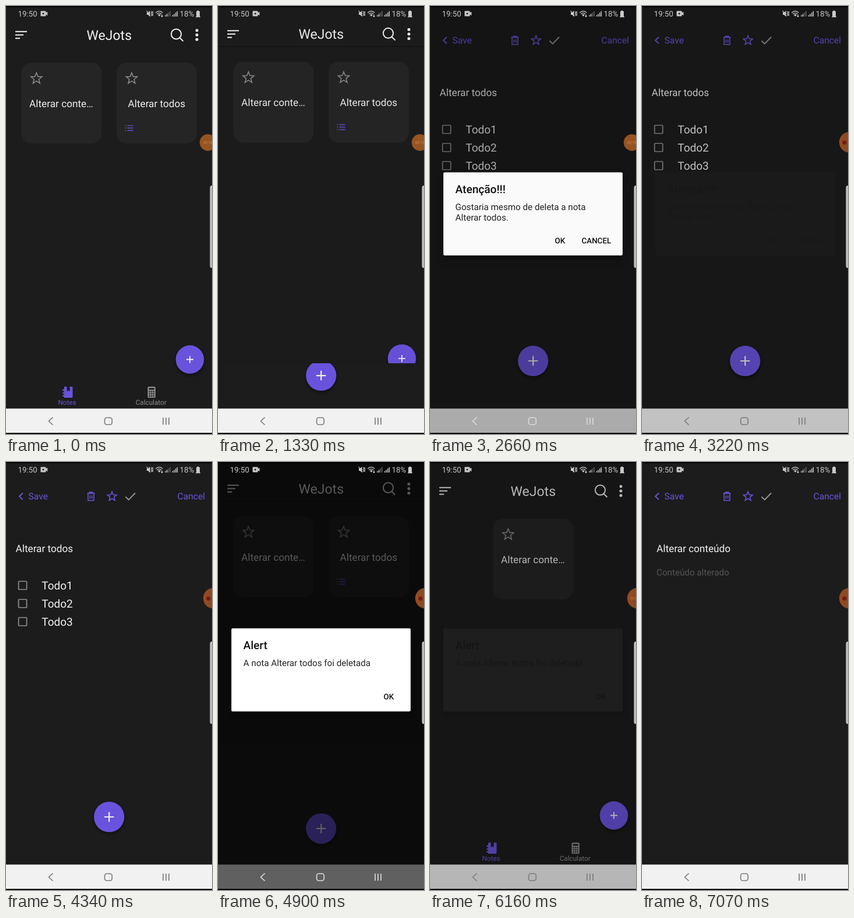
Animation, 354 px wide and 732 px high, one loop 8 s. Source, as an HTML page:

```html
<!DOCTYPE html>
<html lang="pt">
<head>
<meta charset="utf-8">
<title>Notes</title>
<style>
html, body { margin: 0; width: 354px; height: 732px; overflow: hidden; background: #1c1c1c; }
svg { display: block; font-family: Roboto, sans-serif; text-rendering: geometricPrecision; }
</style>
</head>
<body>
<svg id="stage" width="354" height="732" viewBox="0 0 354 732" fill="none">
  <defs>
    <filter id="shadow" x="-40%" y="-40%" width="180%" height="190%">
      <feDropShadow dx="0" dy="3" stdDeviation="3" flood-color="#000" flood-opacity=".5"/>
    </filter>
    <filter id="lift" x="-10%" y="-20%" width="120%" height="150%">
      <feDropShadow dx="0" dy="7" stdDeviation="7" flood-color="#000" flood-opacity=".4"/>
    </filter>
    <clipPath id="reveal"><rect id="revealBox" width="354" height="688"/></clipPath>
    <linearGradient id="amber" x1="0" x2="1">
      <stop offset="0" stop-color="#9c4820"/><stop offset=".5" stop-color="#834c24"/>
    </linearGradient>
    <path id="star"/>
    <g id="card">
      <rect width="138" height="138" rx="17" fill="#252525"/>
      <use href="#star" transform="translate(26 27.1)" stroke="#8a8a8a" stroke-width="1.6"/>
    </g>
  </defs>
  <rect width="354" height="732" fill="#1c1c1c"/>

  <g id="home">
    <rect width="354" height="720" fill="#1c1c1c"/>
    <path id="rule" d="M0 71H354" stroke="#000" stroke-opacity=".45"/>
    <g stroke="#f2f2f2" stroke-width="2">
      <path d="M16 43.8H36M16 49.5H30M16 55.2H24"/>
      <circle cx="292.5" cy="48" r="8.6"/><path d="M298.6 54.3L304.5 60.2"/>
    </g>
    <g fill="#f2f2f2">
      <circle cx="328" cy="41.8" r="2.5"/><circle cx="328" cy="49.5" r="2.5"/><circle cx="328" cy="57.2" r="2.5"/>
      <text x="177.3" y="58" font-size="23" text-anchor="middle">WeJots</text>
    </g>
    <g id="first">
      <use href="#card"/>
      <text x="13.8" y="76" font-size="17.2" fill="#efefef">Alterar conte…</text>
    </g>
    <g id="second" transform="translate(190 97)">
      <use href="#card"/>
      <text x="19.5" y="76" font-size="17.2" fill="#efefef">Alterar todos</text>
      <path d="M18.5 107.5H28.5M18.5 111.7H28.5M18.5 115.9H28.5M14.5 107.5h1.8M14.5 111.7h1.8M14.5 115.9h1.8" stroke="#5c49be" stroke-width="1.7"/>
    </g>
    <g filter="url(#shadow)"><circle cx="316" cy="604.5" r="24.2" fill="#6a53dc"/></g>
    <path d="M310 604.5h12M316 598.5v12" stroke="#f0eefa" stroke-width="1.8"/>
    <g fill="#6a53dc">
      <path d="M100 651h4.6v8.2l2.5-1.8 2.5 1.8V651h3.2q1.7 0 1.7 1.7v15.6q0 1.7-1.7 1.7H100v-2h-1.7l-1.6-1.4 1.6-1.4H100v-2h-1.7l-1.6-1.4 1.6-1.4H100v-2h-1.7l-1.6-1.4 1.6-1.4H100z"/>
      <text x="105" y="682" font-size="11.7" text-anchor="middle">Notes</text>
    </g>
    <g fill="#8f8f8f">
      <rect x="243.5" y="651" width="13.3" height="19" rx="1.8"/>
      <text x="249.2" y="682" font-size="11.7" text-anchor="middle">Calculator</text>
    </g>
    <path d="M245.6 654.8h9.2" stroke="#1c1c1c" stroke-width="3"/>
    <path d="M245.6 659.7h9.2M245.6 663.4h9.2M245.6 667.1h9.2" stroke="#1c1c1c" stroke-width="2.2" stroke-dasharray="2.2 1.3"/>
    <rect id="veil" width="354" height="720" fill="#000"/>
  </g>

  <g clip-path="url(#reveal)">
    <g id="edit">
      <rect y="-60" width="354" height="780" fill="#1c1c1c"/>
      <g stroke="#6a53dc" stroke-width="2">
        <path d="M28.8 53L23 58.7L28.8 64.4"/>
        <path d="M139.5 53.6h13M143.4 53.3v-1.7h5.2v1.7M141 54v11.8h10V54M144.3 57.3v5.4M147.7 57.3v5.4" stroke-width="1.6"/>
        <use href="#star" transform="translate(182.2 59) scale(.83)" stroke-width="1.9"/>
      </g>
      <path d="M205.5 59.5L210.8 64.6L222 53" stroke="#959595" stroke-width="2"/>
      <g fill="#6a53dc" font-size="15.6">
        <text x="38.6" y="64.4">Save</text><text x="294.5" y="64.4">Cancel</text>
      </g>
      <g id="todos">
        <text x="16.5" y="154" font-size="17.2" fill="#f2f2f2">Alterar todos</text>
        <g id="list"></g>
        <g filter="url(#shadow)"><circle cx="177.2" cy="607" r="26" fill="#6a53dc"/></g>
        <path d="M169 607h16.4M177.2 598.8v16.4" stroke="#f0eee0" stroke-width="2.2"/>
      </g>
      <g id="plain">
        <text x="25" y="154" font-size="17.2" fill="#f2f2f2">Alterar conteúdo</text>
        <text x="25" y="194" font-size="15.2" fill="#555">Conteúdo alterado</text>
      </g>
    </g>
  </g>

  <rect y="688.5" width="354" height="41.5" fill="#f1f1f1"/>
  <rect id="dim" width="354" height="732" fill="#000"/>

  <g id="dialog">
    <rect x="23" y="284.5" width="308" height="142" rx="2" fill="#fff" filter="url(#lift)"/>
    <g fill="#111">
      <text id="head" x="43.5" y="320" font-size="19.1" font-weight="500"></text>
      <text id="line1" x="43.6" y="348.6" font-size="15.2" fill="#222"></text>
      <text id="line2" x="43.6" y="366.6" font-size="15.2" fill="#222"></text>
      <g font-size="13.4" font-weight="500">
        <text id="ok" y="405.6">OK</text>
        <text id="cancel" x="260.5" y="405.6">CANCEL</text>
      </g>
    </g>
  </g>

  <path d="M0 1H354M0 731H354" stroke="#000" stroke-width="2"/>
  <g id="nav" stroke-width="1.7">
    <path d="M80.5 703.5L73.5 710L80.5 716.5"/>
    <rect x="169.6" y="704" width="12.6" height="12" rx="3.6"/>
    <path d="M270 704v12M275 704v12M280 704v12"/>
  </g>

  <g fill="#c9c9c9">
    <g font-size="13.3"><text x="20.5" y="17.6">19:50</text><text x="298.5" y="17.6">18%</text></g>
    <path d="M60.5 8.5h7q1 0 1 1v2l2.8-1.8v6.6l-2.8-1.8v2q0 1-1 1h-7q-1 0-1-1v-7q0-1 1-1z"/>
    <circle cx="64" cy="13" r="1.5" fill="#1c1c1c"/>
    <path d="M242 11h2l3.5-3v10l-3.5-3h-2z"/>
    <path d="M263.4 18l-2.4-3q2.4-1.8 4.8 0z"/>
    <path d="M327 9h1.6V7.8h2.8V9h1.6v9.2h-6z"/>
  </g>
  <path d="M241.5 8L248 17.5M249.5 9l1.3 2-1.3 2 1.3 2-1.3 2M252.2 9v8M257.2 11.5q6-5.6 12 0M259.2 13.7q4-3.6 8 0M268 14.5v4M266.5 17l1.5 1.5 1.5-1.5M326 18.6h8" stroke="#c9c9c9" stroke-width="1.2"/>
  <path id="bars" stroke-width="1.5" stroke="#c9c9c9"/>
  <path id="weak" stroke-width="1.5" stroke="#666"/>

  <rect x="350.4" y="307" width="9" height="141" rx="3.5" fill="#bdbdbd"/>
  <g id="timer">
    <circle cx="347" cy="233.5" r="14.2" fill="#985420"/>
    <text id="clock" x="338.5" y="236" font-size="6.6" fill="#dba36c" fill-opacity=".7"></text>
  </g>
  <g id="rec">
    <circle cx="356.5" cy="233" r="17.6" fill="url(#amber)"/>
    <circle id="dot" cx="347.8" cy="233.4" r="3.5" fill="#701c0e"/>
    <text id="tiny" x="343.5" y="235.4" font-size="6" fill="#c9774a">00:22</text>
  </g>
</svg>
<script>
const LOOP = 8000, H = 688;
const $ = id => document.getElementById(id);
const set = (id, name, value) => $(id).setAttribute(name, value);
const show = (id, on) => set(id, 'display', on ? 'inline' : 'none');
const clamp = v => Math.min(1, Math.max(0, v));
const ramp = (t, start, span) => clamp((t - start) / span);
const mix = (a, b, k) => a + (b - a) * k;

const alertBox = { head: 'Alert', lines: ['A nota Alterar todos foi deletada', ''], ok: 284.5, cancel: false };
const dialogs = [
  { open: 2540, close: 3060, head: 'Atenção!!!', lines: ['Gostaria mesmo de deleta a nota', 'Alterar todos.'], ok: 214.5, cancel: true },
  { open: 4590, close: 5140, ...alertBox },
  { open: 5405, close: 6020, ...alertBox }
];

function build() {
  const pts = Array.from({ length: 10 }, (_, i) => {
    const a = i * Math.PI / 5, r = i % 2 ? 4.3 : 10;
    return `${(r * Math.sin(a)).toFixed(2)} ${(-r * Math.cos(a)).toFixed(2)}`;
  });
  set('star', 'd', `M${pts.join('L')}Z`);
  $('list').innerHTML = [1, 2, 3].map((n, i) => {
    const y = 211 + 31 * i;
    return `<rect x="21.6" y="${y - 7}" width="14" height="14" rx="1" stroke="#8f8f8f" stroke-width="1.7"/>
      <text x="61.3" y="${y + 6.9}" font-size="19" fill="#f2f2f2">Todo${n}</text>`;
  }).join('');
  const bars = (x, from, to) => {
    let d = '';
    for (let i = from; i < to; i++) d += `M${x + i * 2.6} 18v${-2.4 - i * 2.2}`;
    return d;
  };
  set('bars', 'd', bars(274, 0, 2) + bars(286.5, 0, 4));
  set('weak', 'd', bars(274, 2, 4));
}

// cubic-bezier(.35, .45, 0, 1)
function ease(x) {
  if (x <= 0 || x >= 1) return clamp(x);
  let lo = 0, hi = 1, s;
  for (let i = 0; i < 24; i++) {
    s = (lo + hi) / 2;
    if (1.05 * s * (1 - s) ** 2 + s ** 3 < x) lo = s; else hi = s;
  }
  return 1.35 * s * (1 - s) ** 2 + 3 * s * s * (1 - s) + s ** 3;
}
const slide = (t, start) => ease(ramp(t, start, 425));

function drawPages(t) {
  const p = slide(t, 1300) - slide(t, 4785) + slide(t, 6650);
  set('home', 'transform', `translate(0 ${-0.02 * H * p})`);
  set('veil', 'opacity', 0.1 * clamp(p / 0.36));
  show('rule', p > 0.001);
  set('revealBox', 'y', (1 - p) * H);
  set('revealBox', 'height', Math.max(0, p * H + 1));
  set('edit', 'transform', `translate(0 ${0.041 * H * (1 - p)})`);
  show('edit', p > 0.001);
  const deleted = t >= 5250;
  set('first', 'transform', `translate(${deleted ? 108.3 : 26.3} 97)`);
  show('second', !deleted);
  show('todos', t < 6000);
  show('plain', t >= 6000);
}

function drawDialog(t) {
  const d = dialogs.find(d => t >= d.open && t < d.close + 240);
  show('dialog', d);
  let dim = 0, light = 0;
  if (d) {
    const closing = t >= d.close;
    const alpha = closing ? (1 - ramp(t, d.close, 210)) ** 3 : 1 - (1 - ramp(t, d.open, 165)) ** 3;
    dim = 0.6 * (closing ? 1 - ramp(t, d.close, 240) : ramp(t, d.open, 250));
    light = closing ? 1 - ramp(t, d.close, 120) : ramp(t, d.open, 90);
    set('dialog', 'opacity', alpha);
    $('head').textContent = d.head;
    $('line1').textContent = d.lines[0];
    $('line2').textContent = d.lines[1];
    set('ok', 'x', d.ok);
    show('cancel', d.cancel);
  }
  set('dim', 'opacity', dim);
  const g = Math.round(mix(125, 218, light));
  set('nav', 'stroke', `rgb(${g},${g},${g})`);
}

function drawRecorder(t) {
  const docked = t >= 2800, counting = t >= 5950 && t < 6370;
  show('timer', !docked);
  show('rec', docked);
  show('dot', !counting);
  show('tiny', counting);
  $('clock').textContent = t < 1120 ? '00:18' : '00:19';
}

function draw(t) {
  drawPages(t);
  drawDialog(t);
  drawRecorder(t);
}

build();
draw(0);
const begin = performance.now();
(function tick() {
  draw((performance.now() - begin) % LOOP);
  requestAnimationFrame(tick);
})();
</script>
</body>
</html>
```
